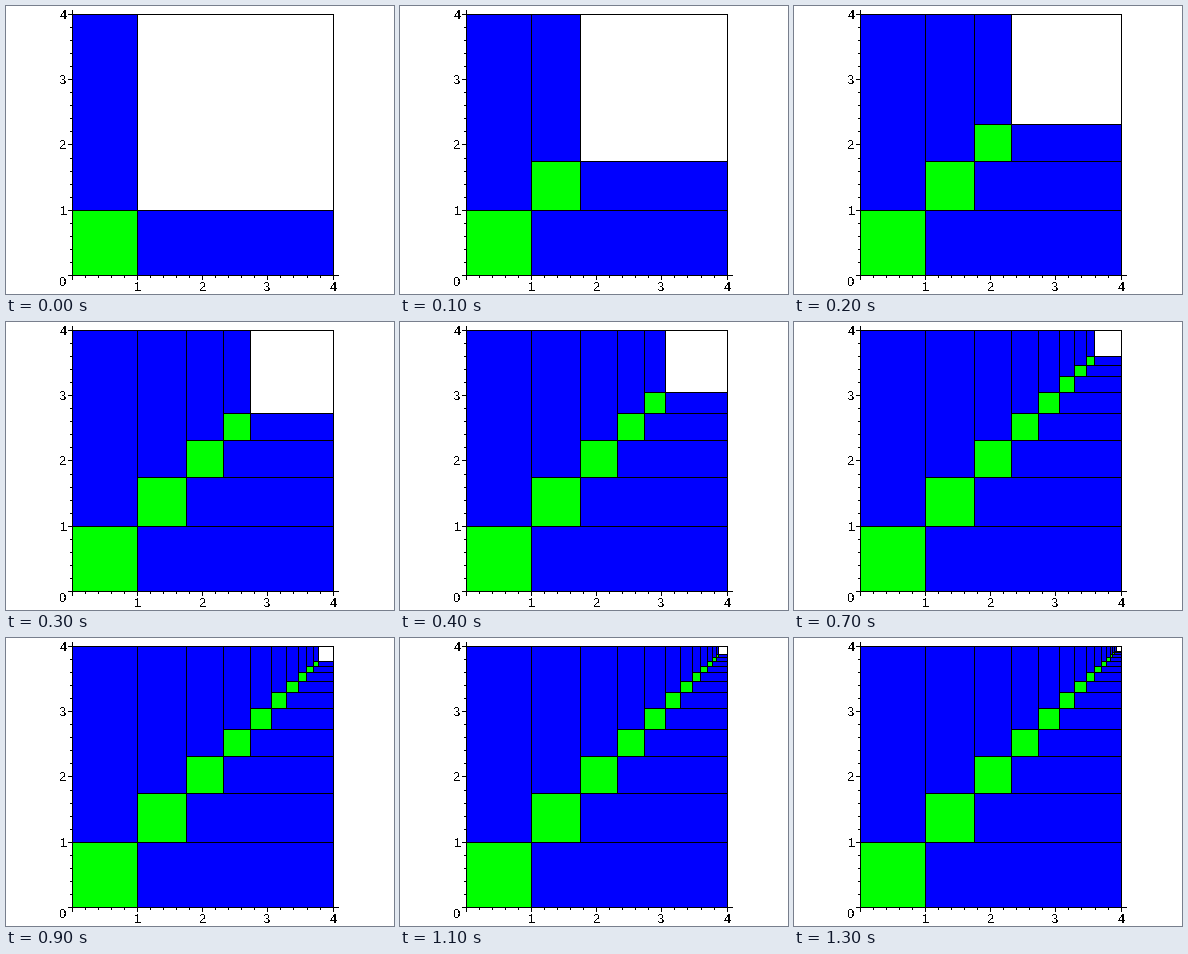
These frames come from a looping animation (388 px wide and 288 px high, 1.4 s). A matplotlib script:

```python
import matplotlib.pyplot as plt
from matplotlib.animation import FuncAnimation
from matplotlib.patches import Rectangle

WIDTH, HEIGHT, DPI = 388, 288, 100
STEPS = 14
BLUE, GREEN = "#0000ff", "#00ff00"

plt.rcParams["text.antialiased"] = False
plt.rcParams["font.family"] = "Liberation Sans"

fig = plt.figure(figsize=(WIDTH / DPI, HEIGHT / DPI), dpi=DPI, facecolor="white")
ax = fig.add_axes([0, 0, 1, 1])
ax.set_xlim(0, WIDTH)
ax.set_ylim(HEIGHT, 0)
ax.axis("off")


def px(x):
    return round(65.8 + 65.2 * x)


def py(y):
    return round(269 - 65.25 * y)


def block(left, top, right, bottom, color="black"):
    """Fill whole pixels, both corners included."""
    patch = Rectangle((left, top), right - left + 1, bottom - top + 1,
                      facecolor=color, edgecolor="none", linewidth=0,
                      antialiased=False)
    return ax.add_patch(patch)


def box(x0, y0, x1, y1, color):
    """Filled box in plot units with a one-pixel black outline."""
    left, right, top, bottom = px(x0), px(x1), py(y1), py(y0)
    parts = [block(left, top, right, bottom)]
    if right - left > 1 and bottom - top > 1:
        parts.append(block(left + 1, top + 1, right - 1, bottom - 1, color))
    return parts


def corner(k):
    return 4 * (1 - 0.75 ** k)


def label(x, baseline, text):
    ax.text(x, baseline, text, fontsize=13 * 72 / DPI, color="black",
            ha="center", va="baseline")


def draw_axes():
    x0, y0 = px(0), py(0)
    block(x0, 4, x0, y0)
    block(x0, y0, 332, y0)
    for i in range(21):
        length = 4 if i % 5 == 0 else 2
        x, y = px(i / 5), py(i / 5)
        block(x, y0, x, y0 + length)
        block(x0 - length, y, x0, y)
    label(57.5, 280, "0")
    for n in range(1, 5):
        label(px(n) + 0.5, 285, str(n))
        label(57.5, py(n) + 5, str(n))


box(0, 0, 4, 4, "white")
layers = []
for k in range(STEPS):
    a, b = corner(k), corner(k + 1)
    layers.append(box(a, b, b, 4, BLUE)
                  + box(b, a, 4, b, BLUE)
                  + box(a, a, b, b, GREEN))
    # The shared edges stay black whichever box is drawn last.
draw_axes()


def update(frame):
    for k, parts in enumerate(layers):
        for part in parts:
            part.set_visible(k <= frame)
    return []


anim = FuncAnimation(fig, update, frames=STEPS, interval=100, repeat=True,
                     repeat_delay=0, blit=False)
plt.show()
```
